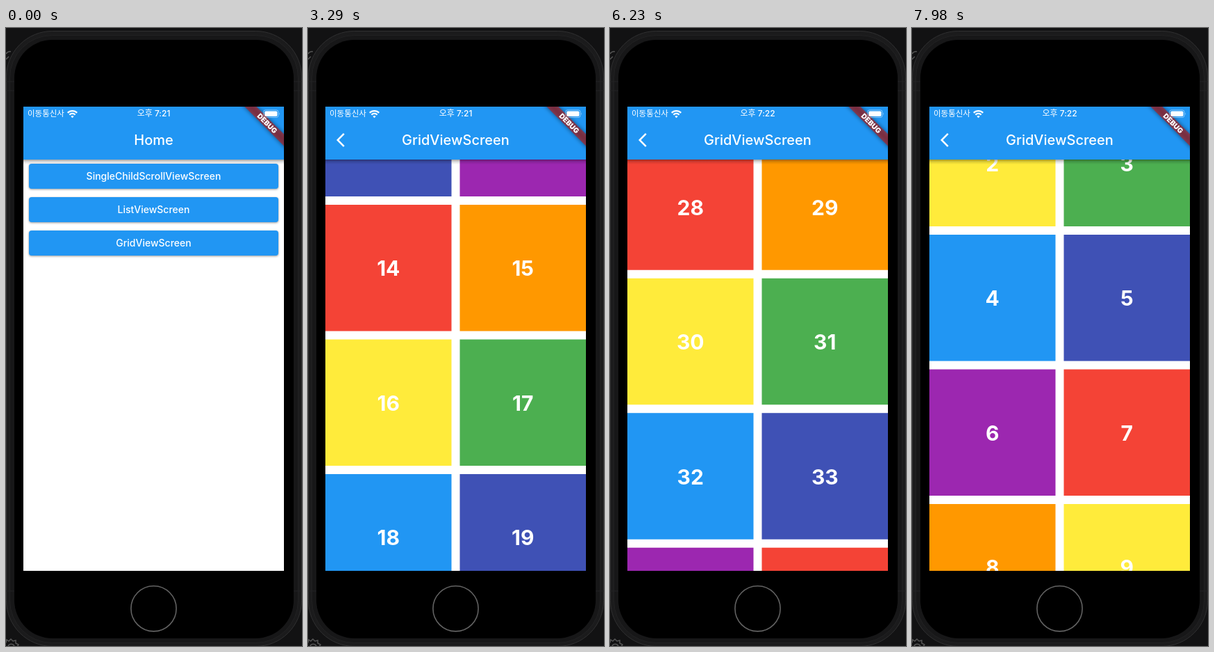
Animation of 426x888 px, one loop 8 s. Source, as an HTML page:

```html
<!DOCTYPE html>
<html lang="ko">
<head>
<meta charset="utf-8">
<title>Grid scroll</title>
<style>
html, body { margin: 0; width: 100%; height: 100%; overflow: hidden; background: #121213; }
svg { display: block; width: 426px; height: 888px; }
text { fill: #fff; font-family: Inter, "Noto Sans CJK KR", "Noto Sans CJK", sans-serif; text-anchor: middle; }
.title { font-size: 20px; font-weight: 500; }
.label { font-size: 14px; font-weight: 500; }
.num { font-size: 30px; font-weight: 700; }
.carrier { font-size: 11.5px; text-anchor: start; }
.clock { font-size: 12px; font-weight: 500; }
.debug { font-size: 10.2px; font-weight: 900; }
.btn { filter: drop-shadow(0 1.5px 1.5px rgba(0, 0, 0, .4)); }
</style>
</head>
<body>
<svg viewBox="0 0 426 888">
  <defs>
    <clipPath id="screen"><rect x="25" y="113" width="375" height="667"/></clipPath>
    <linearGradient id="drop" x2="0" y2="1">
      <stop stop-opacity=".36"/><stop offset=".45" stop-opacity=".14"/><stop offset="1" stop-opacity="0"/>
    </linearGradient>
    <linearGradient id="edge"><stop stop-opacity="0"/><stop offset="1" stop-opacity=".14"/></linearGradient>
    <filter id="blur" x="-20%" y="-100%" width="140%" height="300%"><feGaussianBlur stdDeviation="3"/></filter>
  </defs>

  <rect width="426" height="888" fill="#121213"/>
  <g fill="none" stroke="#555" stroke-width="1.5">
    <path d="M0 37Q3 33 7 34M0 45Q2 43 4 41"/>
    <path d="M-3 884l3-1 1-4 3 2 3-3 3 3 4-1v4l4 2-2 3M3 888a5 5 0 0 1 9 0"/>
  </g>
  <rect x=".5" y="4.5" width="425" height="884" rx="66" fill="#1b1b1c" stroke="#303031"/>
  <rect x="5.5" y="10.5" width="415" height="873" rx="61" fill="#171718" stroke="#222223"/>
  <path d="M0 77h12M0 90h12M414 77h12M414 90h12M0 809h12M414 809h12" stroke="#232324"/>
  <rect x="12" y="17" width="402" height="860" rx="55"/>
  <circle cx="212.5" cy="834.3" r="32.6" fill="none" stroke="#626262" stroke-width="1.6"/>

  <g clip-path="url(#screen)">
    <g id="home">
      <rect x="25" y="113" width="375" height="667" fill="#fff"/>
      <g id="buttons"></g>
      <rect x="25" y="189" width="375" height="7" fill="url(#drop)"/>
      <rect x="25" y="113" width="375" height="76" fill="#2196f3"/>
      <text class="title" x="212.5" y="168">Home</text>
    </g>
    <g id="grid">
      <rect x="5" y="113" width="20" height="667" fill="url(#edge)"/>
      <rect x="25" y="113" width="375" height="667" fill="#fff"/>
      <g id="tiles"></g>
      <rect x="25" y="189" width="375" height="7" fill="url(#drop)"/>
      <rect x="25" y="113" width="375" height="76" fill="#2196f3"/>
      <path transform="translate(41 149)" fill="#fff" d="M11.67 3.87 9.9 2.1 0 12l9.9 9.9 1.77-1.77L3.54 12z"/>
      <text class="title" x="212.5" y="168">GridViewScreen</text>
    </g>
    <g transform="translate(400 113) rotate(45)">
      <rect x="-60" y="28" width="120" height="12" fill-opacity=".5" filter="url(#blur)"/>
      <rect x="-60" y="28" width="120" height="12" fill="#b71c1c" fill-opacity=".627"/>
      <text class="debug" x="0" y="37.7">DEBUG</text>
    </g>
    <text class="carrier" x="31" y="127.3">이동통신사</text>
    <g fill="none" stroke="#fff" stroke-width="2.3">
      <path d="M88.8 121.9a9.4 9.4 0 0 1 13.4 0M91.4 124.7a5.7 5.7 0 0 1 8.2 0"/>
      <path d="M95.5 129.2 93.4 127a3 3 0 0 1 4.2 0z" fill="#fff" stroke="none"/>
    </g>
    <text class="clock" id="clock" x="212.5" y="127.3"></text>
    <rect x="370.5" y="117.9" width="21.5" height="10.6" rx="3" fill="none" stroke="#fff" stroke-opacity=".45"/>
    <rect x="372.2" y="119.5" width="18.2" height="7.4" rx="1.7" fill="#fff"/>
    <path d="M393.3 121.4q1.6 1.7 0 3.6z" fill="#fff" fill-opacity=".5"/>
  </g>
</svg>
<script>
const LOOP = 8000, STEP = 70;
const TOP = 189, TILE = 181.5, PITCH = 193.5, WIDTH = 375;
const COLORS = ['#f44336', '#ff9800', '#ffeb3b', '#4caf50', '#2196f3', '#3f51b5', '#9c27b0'];
const OPEN = 740, OPEN_MS = 240, DRAG = 2030, MINUTE = 4760;
// time, scroll offset
const KEYS = [[2030, 49.5], [3290, 1289.5], [4340, 2231], [5250, 3039], [5530, 3190], [6860, 1971.5], [7980, 279]];

const $ = id => document.getElementById(id);

function add(parent, tag, attrs, text = '') {
  const el = document.createElementNS('http://www.w3.org/2000/svg', tag);
  for (const k in attrs) el.setAttribute(k, attrs[k]);
  el.textContent = text;
  return parent.appendChild(el);
}

['SingleChildScrollViewScreen', 'ListViewScreen', 'GridViewScreen'].forEach((name, i) => {
  const y = 195 + 48 * i;
  add($('buttons'), 'rect', { class: 'btn', x: 33, y, width: 359, height: 36, rx: 4, fill: '#2196f3' });
  add($('buttons'), 'text', { class: 'label', x: 212.5, y: y + 22.6 }, name);
});

const tiles = Array.from({ length: 10 }, (_, i) => {
  const x = 25 + (i % 2) * PITCH;
  const g = add($('tiles'), 'g', {});
  return {
    g,
    rect: add(g, 'rect', { x, width: TILE, height: TILE }),
    num: add(g, 'text', { class: 'num', x: x + TILE / 2, y: 102.3 })
  };
});

const slopes = KEYS.slice(1).map((k, i) => (k[1] - KEYS[i][1]) / (k[0] - KEYS[i][0]));
const tangents = KEYS.map((_, i) => {
  const a = slopes[i - 1] ?? slopes[i], b = slopes[i] ?? a;
  return a * b <= 0 ? 0 : 2 * a * b / (a + b);
});

// Monotone cubic through KEYS
function scrollAt(t) {
  if (t < DRAG) return 0;
  let i = 0;
  while (i < KEYS.length - 2 && t >= KEYS[i + 1][0]) i++;
  const [t0, a] = KEYS[i], [t1, b] = KEYS[i + 1];
  const d = t1 - t0, u = Math.min(1, (t - t0) / d), v = 1 - u;
  return a * v * v * (1 + 2 * u) + b * u * u * (3 - 2 * u)
    + d * u * v * (tangents[i] * v - tangents[i + 1] * u);
}

function render(t) {
  const p = Math.min(1, Math.max(0, (t - OPEN) / OPEN_MS));
  const open = 1 - (1 - p) ** 3;
  $('home').setAttribute('transform', `translate(${-WIDTH / 3 * open} 0)`);
  $('grid').setAttribute('transform', `translate(${WIDTH * (1 - open)} 0)`);
  $('grid').style.display = open ? '' : 'none';
  $('clock').textContent = t < MINUTE ? '오후 7:21' : '오후 7:22';

  const scroll = scrollAt(t), first = Math.floor(scroll / PITCH);
  tiles.forEach(({ g, rect, num }, i) => {
    const row = first + (i >> 1), n = row * 2 + i % 2;
    g.setAttribute('transform', `translate(0 ${TOP + row * PITCH - scroll})`);
    rect.setAttribute('fill', COLORS[n % 7]);
    num.textContent = n;
  });
}

function frame() {
  const t = performance.now() % LOOP;
  render(Math.floor(t / STEP) * STEP);
  requestAnimationFrame(frame);
}
frame();
</script>
</body>
</html>
```
